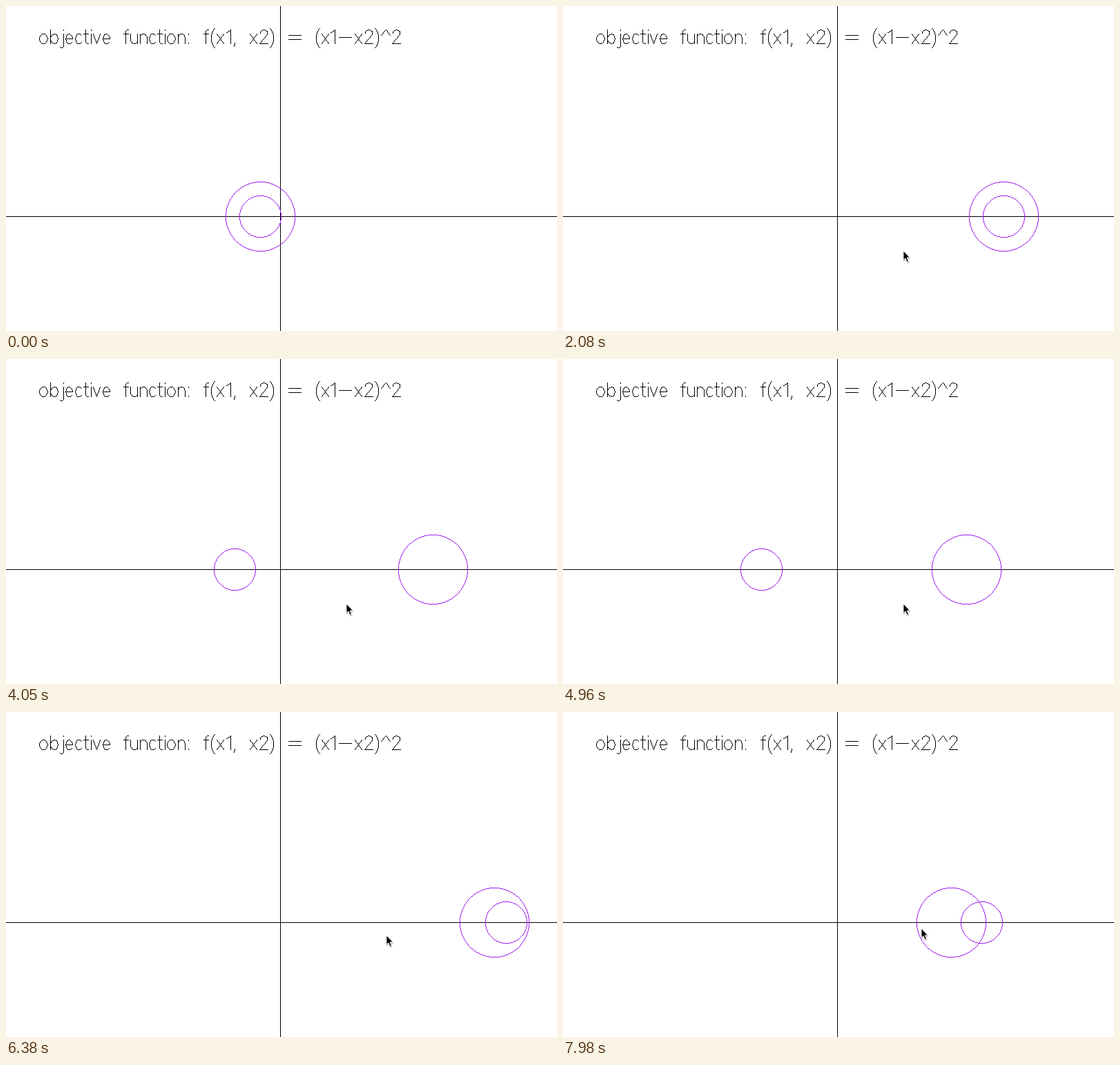
Recreate the animation shown at these times as a matplotlib script. Size 798 by 470 pixels, loop 8000 ms.

```python
import numpy as np
import matplotlib.pyplot as plt
from matplotlib.animation import FuncAnimation
from matplotlib.patches import Polygon

W, H, DPI = 798, 470, 64
LOOP, STEP = 8000, 20
AXIS_X, AXIS_Y = 397, 304
BIG, SMALL = 50, 30
PURPLE = (160, 32, 240)

# Gradient descent on (x1-x2)^2: x1 and x2 close in on their middle,
# the gap shrinking by RATE every TICK ms.
RATE, TICK = 0.872, 30
RUNS = [  # start time, middle, x2 - x1
    (0, 368, 0),
    (680, 638.2, 210),
    (3080, 156.2, 253.4),
    (4000, 475, -330),
    (4930, 435.6, -340.6),
    (5900, 716, 152),
    (7000, 463.8, -130.2),
    (7700, 584.5, 153),
]

# Pointer: time, x, y of the tip
PATH = [(950, 484, 475), (1260, 491, 348), (1400, 493, 354),
        (5000, 493, 354), (5830, 497, 342), (7060, 615, 301),
        (7980, 519, 313)]
ARROW = np.array([(0, 0), (0, 13.5), (3, 10.8), (5, 16), (7.4, 15),
                  (5.2, 10), (9.3, 9.6)])

# Lettering metrics in pixels
CAP, MID, WIDE = 20, 14, 10
GAP, SPACE, BEARING = 3.5, 16.5, 2


def seg(*p):
    return np.array(p, float).reshape(-1, 2)


def stem(x, y0, y1):
    return seg(x, y0, x, y1)


def bar(y, w):
    return seg(0, y, w, y)


def dot(y):
    return stem(0, y, y + 1)


def arc(cx, cy, rx, ry, a0, a1):
    a = np.radians(np.linspace(a0, a1, int(abs(a1 - a0) / 30) + 2))
    return np.column_stack([cx + rx * np.cos(a), cy + ry * np.sin(a)])


def bowl(w, a0=0, a1=360):
    return arc(w / 2, MID / 2, w / 2, MID / 2, a0, a1)


def paren(side):
    a = 180 if side < 0 else 0
    x = 7 if side < 0 else -2
    return arc(x, CAP / 2 - 2, 7, 15, a - side * 70, a + side * 70)


def join(*parts):
    return np.vstack(parts)


GLYPHS = {
    'o': [bowl(12)],
    'b': [stem(0, 0, CAP), bowl(11, 170, -170)],
    'c': [bowl(WIDE, 42, 318)],
    'e': [join(bar(MID / 2, WIDE), bowl(WIDE, 10, 318))],
    'f': [join(arc(6, 16, 3, 4, 70, 180), seg(3, 0)), bar(MID, 7)],
    'i': [stem(0, 0, MID), dot(CAP - 1)],
    'j': [join(seg(5, MID), arc(2, -3, 3, 3, 0, -130)),
          dot(CAP - 1) + (5, 0)],
    'n': [stem(0, 0, MID), join(arc(5, 9, 5, 5, 170, 0), seg(WIDE, 0))],
    't': [join(seg(3, CAP), arc(6, 4, 3, 4, 180, 280)), bar(MID, 7)],
    'u': [join(seg(0, MID), arc(5, 5, 5, 5, 180, 350)),
          stem(WIDE, 0, MID)],
    'v': [seg(0, MID, WIDE / 2, 0, WIDE, MID)],
    'x': [seg(0, MID, WIDE, 0), seg(0, 0, WIDE, MID)],
    '1': [seg(0, 16, 2, 17, 6, CAP, 6, 0)],
    '2': [join(arc(6, 15, 5.5, 5, 180, -25), bar(0, 12))],
    '(': [paren(-1)],
    ')': [paren(1)],
    ':': [dot(0), dot(MID - 1)],
    ',': [seg(1, 1, 1, 0, 0, -4)],
    '=': [bar(12, 18), bar(6, 18)],
    '-': [bar(9, 18)],
    '^': [seg(0, 12, 6.5, CAP, 13, 12)],
}


def stroke(img, pts):
    """One-pixel polyline through whole-pixel corners."""
    for p, q in zip(pts[:-1], pts[1:]):
        n = int(abs(q - p).max()) + 1
        xs, ys = np.rint(np.linspace(p, q, n)).astype(int).T
        img[ys, xs] = 0


def write(img, text, x, base):
    for ch in text:
        if ch == ' ':
            x += SPACE
            continue
        pad = BEARING if ch in ':,=-' else 0
        x += pad
        for s in GLYPHS[ch]:
            stroke(img, np.rint(s * (1, -1) + (np.rint(x), base)))
        x += max(s[:, 0].max() for s in GLYPHS[ch]) + pad + GAP


def ring(r):
    """One-pixel circle as offsets from its centre."""
    a = np.arange(int(r / np.sqrt(2)) + 1)
    b = np.rint(np.sqrt(r * r - a * a)).astype(int)
    u, v = np.concatenate([a, b]), np.concatenate([b, a])
    return np.concatenate([u, u, -u, -u]), np.concatenate([v, -v, v, -v])


RINGS = [ring(BIG), ring(SMALL)]

page = np.full((H, W, 3), 255, np.uint8)
page[AXIS_Y, :] = 0
page[:, AXIS_X] = 0
write(page, 'objective function: f(x1, x2) = (x1-x2)^2', 48, 54)


def centres(t):
    start, mid, gap = [r for r in RUNS if r[0] <= t][-1]
    half = gap / 2 * RATE ** ((t - start) // TICK)
    return int(mid - half), int(mid + half)


def render(t):
    img = page.copy()
    for cx, (dx, dy) in zip(centres(t), RINGS):
        x, y = cx + dx, AXIS_Y + dy
        ok = (x >= 0) & (x < W)
        img[y[ok], x[ok]] = PURPLE
    return img


def tip(t):
    times, xs, ys = zip(*PATH)
    return np.rint([np.interp(t, times, xs), np.interp(t, times, ys)])


fig = plt.figure(figsize=(W / DPI, H / DPI), dpi=DPI, facecolor='white')
ax = fig.add_axes([0, 0, 1, 1])
ax.axis('off')
view = ax.imshow(page, extent=(0, W, H, 0), interpolation='nearest',
                 aspect='auto')
ax.set_xlim(0, W)
ax.set_ylim(H, 0)

shadow = ax.add_patch(Polygon(ARROW, fc='black', ec='black', lw=1.5,
                              alpha=0.18, zorder=3))
pointer = ax.add_patch(Polygon(ARROW, fc='black', ec='white', lw=0.9,
                               zorder=4))


def update(i):
    t = (i + 0.5) * STEP
    view.set_data(render(t))
    pointer.set_xy(ARROW + tip(t))
    shadow.set_xy(ARROW + tip(t) + (0.5, 1.5))
    return view, shadow, pointer


anim = FuncAnimation(fig, update, frames=LOOP // STEP, interval=STEP,
                     repeat=True, repeat_delay=0, blit=False)
plt.show()
```
